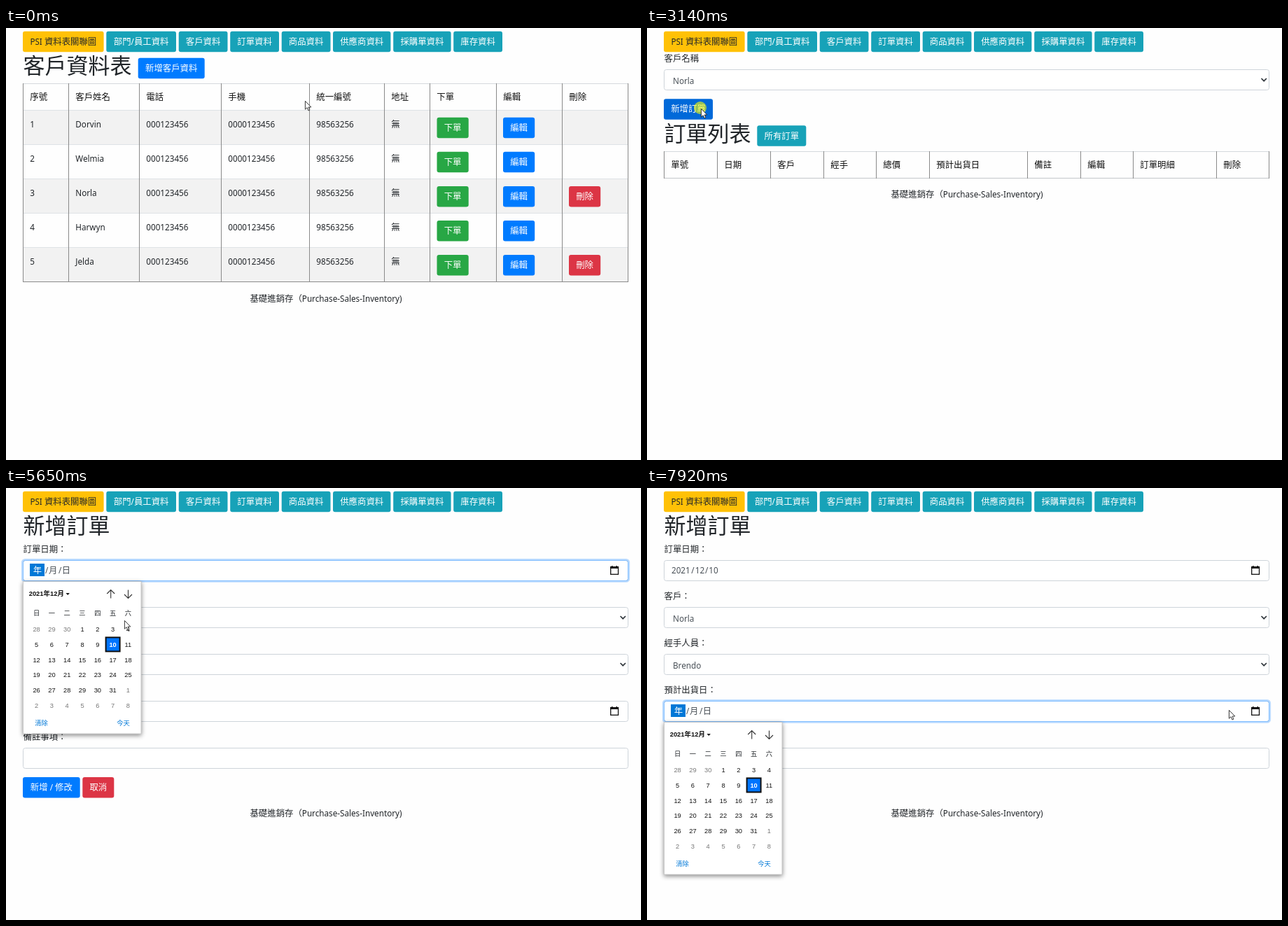
Write an HTML page that moves like this. It is 907x617 px and loops after 7.99 s.

```html
<!DOCTYPE html>
<html lang="zh-Hant">
<head>
<meta charset="utf-8">
<style>
html, body { margin: 0; width: 100%; height: 100%; overflow: hidden; background: #fefefe; }
svg { display: block; }
text { font-family: 'Noto Sans', 'Noto Sans CJK TC', sans-serif; white-space: pre; }
.popup text { font-family: 'Liberation Sans', 'Noto Sans CJK TC', sans-serif; }
.popup { filter: drop-shadow(0 2px 3px #0007); }
</style>
</head>
<body>
<svg id="stage" width="907" height="617" viewBox="0 0 907 617"></svg>
<script>
const LOOP = 7990, STEP = 70;
const BLUE = '#007bff', TEAL = '#17a2b8', GREEN = '#28a745', RED = '#dc3545', INK = '#212529', GREY = '#495057';
const FOOTER = '基礎進銷存（Purchase-Sales-Inventory)';

// Text is placed by the middle of its line; Latin runs are set slightly smaller than CJK.
function text(x, y, str, { size = 12.4, fill = INK, weight = 400, anchor = 'start', latin = 0.943 } = {}) {
  const body = str.replace(/[ -~]+/g, run => `<tspan font-size="${size * latin}">${run}</tspan>`);
  return `<text x="${x}" y="${y + size * 0.37}" font-size="${size}" font-weight="${weight}" fill="${fill}" text-anchor="${anchor}">${body}</text>`;
}
const rect = (x, y, w, h, attrs) => `<rect x="${x}" y="${y}" width="${w}" height="${h}" ${attrs}/>`;
const path = (d, attrs) => `<path d="${d}" ${attrs}/>`;
const title = (y, str) => text(24.5, y, str, { size: 31, weight: 300 });
const footer = y => text(457, y, FOOTER, { anchor: 'middle' });

function button(x, y, w, label, color, ink = '#fff') {
  return rect(x, y, w, 29.5, `rx="3" class="button" fill="${color}"`) +
    text(x + w / 2, y + 14.7, label, { fill: ink, anchor: 'middle' });
}

function nav() {
  const items = [[143.3, 99.7, '部門/員工資料'], [246.7, 69.8, '客戶資料'], [320.2, 69.8, '訂單資料'], [393.7, 69.8, '商品資料'],
    [467, 82.4, '供應商資料'], [553.2, 82.4, '採購單資料'], [639.2, 69.8, '庫存資料']];
  return button(24, 4.7, 115.6, 'PSI 資料表關聯圖', '#ffc107', INK) +
    items.map(([x, w, label]) => button(x, 4.7, w, label, TEAL)).join('');
}

function table(cols, top, heads, rows) {
  const bottom = top + 38.5 + rows * 49.1;
  let out = '';
  for (let r = 0; r < rows; r++) {
    const y = top + 38.5 + r * 49.1;
    if (r % 2 === 0) out += rect(24, y, 865, 49.1, 'fill="#f2f2f2"');
    out += path(`M24 ${Math.round(y) - 0.5}H889`, 'stroke="#dee2e6"');
  }
  out += path(`M24 ${top + 0.5}H889`, 'stroke="#d5d9dd"');
  out += path(`M24 ${Math.round(bottom) - 0.5}H889`, `stroke="${rows ? '#8a8a8a' : '#c4c7ca'}"`);
  out += cols.map(x => path(`M${x + 0.5} ${top}V${Math.round(bottom)}`, 'stroke="#8a8a8a"')).join('');
  return out + heads.map((h, i) => text(cols[i] + 10.3, top + 19, h, { weight: 500, fill: '#111' })).join('');
}

function customers() {
  const cols = [24, 89, 190, 307, 433, 540, 605, 700, 794, 888];
  const heads = ['序號', '客戶姓名', '電話', '手機', '統一編號', '地址', '下單', '編輯', '刪除'];
  const people = ['Dorvin', 'Welmia', 'Norla', 'Harwyn', 'Jelda'];
  let out = nav() + title(54, '客戶資料表') + button(188.7, 42.7, 95, '新增客戶資料', BLUE) + table(cols, 79, heads, 5);
  people.forEach((name, i) => {
    const y = 118 + i * 49.1;
    [i + 1 + '', name, '000123456', '0000123456', '98563256', '無'].forEach((s, c) => out += text(cols[c] + 10.3, y + 19.5, s));
    out += button(615.5, y + 9.7, 45.2, '下單', GREEN) + button(710, y + 9.7, 45.2, '編輯', BLUE);
    if (i === 2 || i === 4) out += button(804, y + 9.7, 45.2, '刪除', RED);
  });
  return out + footer(386);
}

const field = y => rect(24.5, y + 0.5, 864, 29, 'rx="3" fill="#fff" stroke="#ced4da"');
const select = (y, value) => field(y) + text(37, y + 16, value, { fill: GREY }) +
  path(`M877.5 ${y + 13}l3.7 3.7 3.7-3.7`, 'fill="none" stroke="#343a40" stroke-width="1.7"');
const dateField = y => field(y) +
  rect(863.7, y + 9.7, 10.8, 10.6, 'fill="none" stroke="#111" stroke-width="1.3"') +
  path(`M863 ${y + 9}h12v3h-12zM865 ${y + 8}h1.5v2h-1.5zM871.5 ${y + 8}h1.5v2h-1.5z`, 'fill="#111"');

function orders() {
  const heads = ['單號', '日期', '客戶', '經手', '總價', '預計出貨日', '備註', '編輯', '訂單明細', '刪除'];
  return nav() + text(24.5, 43, '客戶名稱') + select(59, 'Norla') + button(24, 101.2, 70, '新增訂單', BLUE) +
    title(151, '訂單列表') + button(157.3, 139.3, 70, '所有訂單', TEAL) +
    table([24, 100, 176, 252, 327, 403, 543, 619, 694, 813, 888], 176, heads, 0) + footer(237);
}

function form() {
  const labels = ['訂單日期：', '客戶：', '經手人員：', '預計出貨日：', '備註事項：'];
  return nav() + title(54, '新增訂單') + labels.map((s, i) => text(24.5, 87 + i * 67, s)).join('') +
    dateField(103) + select(170, 'Norla') + select(237, 'Brendo') + dateField(304) + field(371) +
    button(24, 413, 81.7, '新增 / 修改', BLUE) + button(109.3, 413, 45, '取消', RED) + footer(464.5);
}

function dateText(y, parts, xs, selected, width) {
  return (selected ? rect(34, y + 5, width, 18, 'fill="#0078d7"') : '') +
    parts.map((s, i) => text(xs[i], y + 14.8, s, { fill: selected && !i ? '#fff' : GREY })).join('');
}
const emptyDate = (y, selected) => dateText(y, ['年', '/', '月', '/', '日'], [38.7, 56, 61, 75, 79.7], selected, 21);
const filledDate = selected => dateText(103, ['2021', '/', '12', '/', '10'], [35, 63.3, 68.8, 83, 88.3], selected, 29);

const ring = (x, y, w) => rect(x - 0.8, y - 0.8, w + 1.6, 31.2, 'rx="4" fill="none" stroke="#007bff" stroke-opacity=".27" stroke-width="2.6"') +
  rect(x + 0.5, y + 0.5, w - 1, 29, 'rx="3" fill="none" stroke="#80bdff"');

function calendar(y) {
  const opts = { size: 9.3, latin: 1, anchor: 'middle' }, line = 'fill="none" stroke="#333" stroke-width="1.1"';
  const colX = c => 43.6 + c * 21.8;
  let out = rect(24.5, y + 0.5, 168.5, 217.5, 'fill="#fff" stroke="#c8c8c8"') +
    text(32.7, y + 18, '2021年12月', { size: 9.4, latin: 1, weight: 700, fill: '#111' }) +
    path(`M85.5 ${y + 17}h5.4l-2.7 3z`, 'fill="#111"') +
    path(`M149.7 ${y + 24.5}v-12m-5.5 5.5l5.5-5.5 5.5 5.5M174.5 ${y + 12.5}v12m-5.5-5.5l5.5 5.5 5.5-5.5`, line);
  [...'日一二三四五六'].forEach((s, c) => out += text(colX(c), y + 46, s, opts));
  for (let i = 0; i < 42; i++) {
    const day = i < 3 ? 28 + i : i < 34 ? i - 2 : i - 33;
    const x = colX(i % 7), dy = y + 68.6 + Math.floor(i / 7) * 21.8;
    const today = i === 12, other = i < 3 || i > 33;
    if (today) out += rect(x - 10, dy - 10, 20, 20, 'fill="#0075ff" stroke="#101010" stroke-width="2"');
    out += text(x, dy, day + '', { ...opts, fill: today ? '#fff' : other ? '#777' : '#111', weight: today ? 700 : 400 });
  }
  const link = { ...opts, fill: '#0078d7' };
  return `<g class="popup">${out}${text(50.5, y + 203, '清除', link)}${text(167.5, y + 203, '今天', link)}</g>`;
}

// [start, end, markup, fade-in ms]
const parts = [
  [0, 1030, customers()],
  [1100, 3360, orders()],
  [3220, 3360, ring(24, 101, 70), 140],
  [3430, LOOP, form()],
  [4840, 7570, ring(24, 103, 865), 210],
  [7500, LOOP, ring(24, 304, 865), 150],
  [3430, 4840, emptyDate(103, false)],
  [4840, 6330, emptyDate(103, true)],
  [6330, 7500, filledDate(true)],
  [7500, LOOP, filledDate(false)],
  [3430, 7500, emptyDate(304, false)],
  [7500, LOOP, emptyDate(304, true)],
  [5050, 6330, calendar(133)],
  [7650, LOOP, calendar(334)]
];

// Pointer stops: [time, x, y]
const stops = [
  [0, 427, 104], [420, 715, 246], [700, 642, 236], [1430, 642, 236], [1640, 560, 261], [2050, 147, 184], [2260, 93, 139],
  [2610, 77, 115], [3890, 77, 115], [4440, 882, 115], [4570, 882, 115], [4640, 872, 120], [5050, 872, 120], [5580, 177, 180],
  [5650, 169, 189], [5930, 150, 223], [6400, 150, 223], [7030, 866, 318], [7180, 873, 323], [7780, 873, 323], [7920, 831, 317], [LOOP, 831, 317]
];
const clicks = [850, 3140, 4840, 6260, 7500];

const stage = document.getElementById('stage');
stage.innerHTML = parts.map(p => `<g class="part">${p[2]}</g>`).join('') +
  `<g id="pointer"><circle id="click" r="9" cx="-1" cy="-1" fill="#ff0" fill-opacity=".6"/>
  <path d="M.4.4V12.2L3.1 9.7 5 14 6.9 13.1 5.1 9H8.8Z" fill="#fff" stroke="#222" stroke-width=".9"/></g>`;
const groups = [...stage.querySelectorAll('.part')];
const pointer = document.getElementById('pointer'), click = document.getElementById('click');

function pointerAt(t) {
  const i = stops.findIndex(s => s[0] > t);
  const [t0, x0, y0] = stops[i - 1], [t1, x1, y1] = stops[i];
  const p = Math.floor((t - t0) / STEP) * STEP / (t1 - t0);
  return [x0 + (x1 - x0) * p, y0 + (y1 - y0) * p];
}

function draw(now) {
  const t = now % LOOP, [x, y] = pointerAt(t);
  parts.forEach(([start, end, , fade], i) => {
    const shown = t >= start && t < end;
    groups[i].style.display = shown ? '' : 'none';
    if (fade) groups[i].style.opacity = Math.min(1, (t - start) / fade);
    if (shown) for (const b of groups[i].querySelectorAll('.button')) {
      const dx = x - b.x.baseVal.value, dy = y - b.y.baseVal.value;
      const over = dx > 0 && dy > 0 && dx < b.width.baseVal.value && dy < 29.5;
      b.style.filter = over ? 'brightness(.85)' : '';
    }
  });
  pointer.setAttribute('transform', `translate(${x} ${y})`);
  click.style.display = clicks.some(c => t >= c && t < c + 140) ? '' : 'none';
  requestAnimationFrame(draw);
}
requestAnimationFrame(draw);
</script>
</body>
</html>
```
